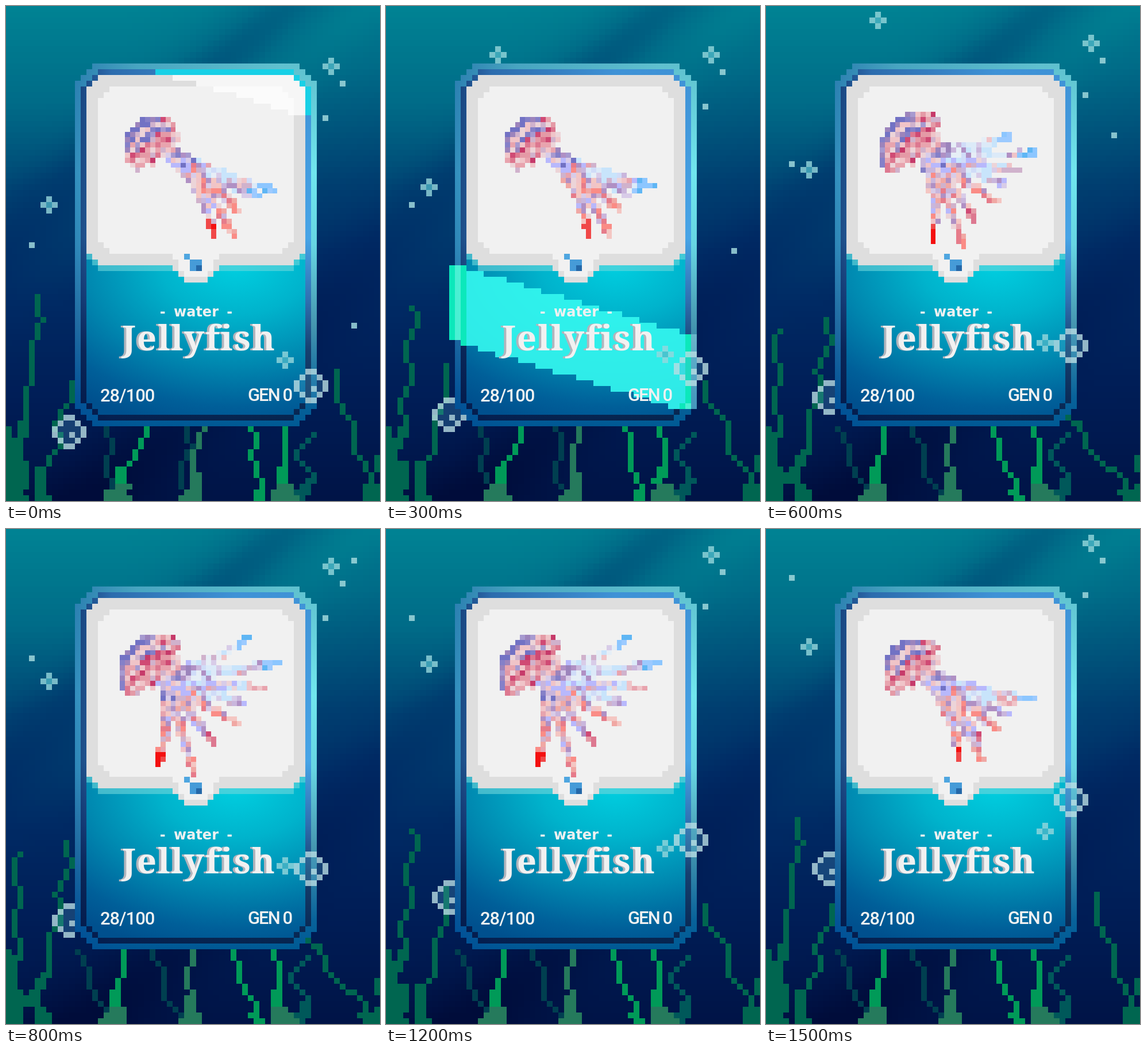
An HTML page with a canvas that plays this animation: 651x861 px, repeating every 1700 ms.

```html
<!DOCTYPE html>
<html lang="en">
<head>
<meta charset="utf-8">
<title>Jellyfish card</title>
<style>
  html, body { margin: 0; width: 651px; height: 861px; overflow: hidden; background: #00285c; }
  canvas, svg { position: absolute; left: 0; top: 0; display: block; }
  text { fill: #f1f1f1; }
  .name { font: 800 60px "Noto Serif", serif; letter-spacing: 2px; text-anchor: middle; }
  .kind { font: bold 24px "DejaVu Sans", sans-serif; word-spacing: 6px; text-anchor: middle; }
  .small { font: 500 31px Roboto, sans-serif; }
</style>
</head>
<body>
<canvas id="stage" width="651" height="861"></canvas>
<svg width="651" height="861" viewBox="0 0 651 861">
  <text class="kind" x="331" y="540">- water -</text>
  <text class="name" x="332" y="599" style="fill:#b2b4bc">Jellyfish</text>
  <text class="name" x="336" y="599">Jellyfish</text>
  <text class="small" x="164" y="688" letter-spacing="-1">28/100</text>
  <text class="small" x="421" y="687" letter-spacing="-2">GEN 0</text>
</svg>
<script>
const ctx = document.getElementById('stage').getContext('2d');
const px = v => Math.round(v * 651 / 65);
const mix = (a, b, u) => a + (b - a) * u;
const clamp = u => Math.max(0, Math.min(1, u));
const smooth = u => u * u * (3 - 2 * u);
const hash = (x, y) => {
  const n = Math.sin(x * 12.9898 + y * 78.233) * 43758.5453;
  return n - Math.floor(n);
};
const pick = (list, r) => list[Math.floor(r * list.length)];

function box(x, y, w, h, color, g = ctx) {
  g.fillStyle = color;
  g.fillRect(px(x), px(y), px(x + w) - px(x), px(y + h) - px(y));
}

// Rectangle with stair-step corners, n cells deep
function stepPath(x, y, w, h, n) {
  ctx.beginPath();
  for (let i = 0; i <= n; i++) {
    const d = n - i, l = px(x + d), t = px(y + i);
    ctx.rect(l, t, px(x + w - d) - l, px(y + h - i) - t);
  }
}

function steps(shape, ...fills) {
  stepPath(...shape);
  for (const fill of fills) {
    ctx.fillStyle = fill;
    ctx.fill();
  }
}

function ramp(grad, stops) {
  stops.forEach(([at, color]) => grad.addColorStop(at, color));
  return grad;
}

// --- sea: depth colours bent by slanted rays ---
const DEPTHS = [[0, 130, 147, 0], [0, 108, 136, 160], [0, 62, 112, 350],
                [0, 42, 100, 500], [0, 29, 86, 680], [0, 12, 58, 1000]];
const bump = (v, mid, size) => Math.exp(-(((v - mid) / size) ** 2));

function seaColor(x, y) {
  const s = x + 1.2 * y;
  const ray = (bump(s, 475, 85) * 150 - bump(s, 620, 70) * 50) * Math.max(0.3, 1 - y / 600)
            + bump(s, 1150, 110) * y * 0.2;
  const d = Math.max(0, Math.min(999, y + 0.17 * Math.max(0, x - 200) * (1 - y / 900) + ray));
  const i = DEPTHS.findIndex(c => c[3] > d);
  const a = DEPTHS[i - 1], b = DEPTHS[i], u = (d - a[3]) / (b[3] - a[3]);
  return `rgb(${[0, 1, 2].map(k => Math.round(mix(a[k], b[k], u)))})`;
}

const sea = document.createElement('canvas');
sea.width = 651;
sea.height = 861;
const seaCtx = sea.getContext('2d');
for (let y = 0; y < 86; y++)
  for (let x = 0; x < 65; x++) box(x, y, 1, 1, seaColor(x * 10, y * 10), seaCtx);

// --- seaweed ---
const MID = '#006650', BRIGHT = '#009a58', GREY = '#257a5c', DARK = '#003f50', DEEP = '#00585a';
// colour, root, top, lean, wave, foot, drift, growth
const sideWeeds = [
  [MID, 1, 50, 4.5, 0.6, 4, -1, 1.5],
  [MID, 0, 73, 0, 0.5, 3, 0, 0],
  [MID, 5, 65, 6, 0.7, 2, -0.1, -2.7],
  [MID, 64, 63, -8, 0.8, 1, -1, 2],
  [MID, 64, 78, 0, 0.6, 2, 0, 0]
];
const midWeeds = [
  [DARK, 18, 73, -1, 0.6, 0, -1.3, 0],
  [DARK, 30, 73, 1, 0.8, 0, -1.5, 0],
  [DEEP, 51, 74, 1, 1.5, 4, -0.3, 0],
  [BRIGHT, 18, 73, 6, 0.4, 6, -1, 0],
  [GREY, 32, 73, 1, 0.6, 4, -0.4, 0],
  [BRIGHT, 44, 73, -2, 0.4, 1, -0.9, 0],
  [BRIGHT, 48, 73, 0, 0.4, 6, -0.4, 0]
];

function weed([color, root, top, lean, wave, foot, drift, growth], pose) {
  const bend = pose * pose, tip = Math.round(top + growth * bend);
  let last;
  for (let y = tip; y < 86; y++) {
    const u = (86 - y) / (86 - tip);
    const x = Math.round(root + (lean + drift * bend) * u + wave * Math.sin(y * 0.7 + root));
    const w = 1 + Math.round(foot * (1 - u) ** 4);
    const from = last < x - 1 ? last + 1 : x, to = last > x + 1 ? last - 1 : x;
    box(from - (w >> 1), y, to - from + w, 1, color === BRIGHT && w > 2 ? GREY : color);
    last = x;
  }
}

// --- bubbles and sparkles ---
const rise = (y, speed, gain, k) => Math.round(y - speed * k - gain * k * k);

function bubble(x, y) {
  for (let j = 0; j < 6; j++)
    for (let i = 0; i < 6; i++) {
      const r = Math.hypot(i - 2.5, j - 2.5);
      if (r > 2.7) continue;
      const rim = r > 2 || (i === 3 && j === 3);
      box(x + i, y + j, 1, 1, rim ? 'rgba(185,222,228,.8)' : 'rgba(90,170,205,.25)');
    }
}

function sparkle(x, y) {
  for (const [i, j] of [[0, -1], [-1, 0], [1, 0], [0, 1]]) box(x + i, y + j, 1, 1, 'rgba(150,215,220,.8)');
  box(x, y, 1, 1, 'rgba(80,185,200,.75)');
}

const dot = (x, y) => box(x, y, 1, 1, 'rgba(160,215,220,.85)');

function behind(n, phase) {
  bubble(8, rise(71, 2.6, 0.28, phase));
  sparkle(19, rise(14, 2, 0, n));
  sparkle(7, rise(34, 1, 0, n));
  sparkle(56, rise(10, 2, 0, phase));
  dot(4, rise(41, 2.36, 0, n));
  dot(58, rise(13, 1.9, 0, phase));
  dot(55, rise(19, 2, 0, phase));
  dot(60, rise(55, 3.3, 0.37, n));
}

function inFront(phase) {
  bubble(50, rise(63, 2.5, 0.55, phase));
  sparkle(48, rise(61, 0.9, 0.35, phase));
}

// --- jellyfish ---
const hues = {
  violet: ['#7272c4', '#8580c8', '#a79ad0', '#9c84bc'],
  crimson: ['#d04a74', '#c63a6a', '#dd7890', '#e49aa6'],
  pink: ['#f0c4c8', '#e8a4ae', '#d0b2cc', '#ecd4d8'],
  lilac: ['#b8b8fc', '#c9b6dc', '#d8cce8', '#b090c4'],
  pale: ['#dceaf8', '#d0dcf8', '#c8e4fb', '#e6eef6'],
  salmon: ['#fa8c86', '#f0a8a4', '#e67c8a', '#f4c6c2'],
  red: ['#f41010', '#f04848'],
  azure: ['#5fb6f4', '#8cc6ff', '#9ccaff']
};
// closed tip, open tip, tip colour
const arms = [
  [18, 24, 7, 25, 'red'], [22, 24, 14, 27, 'salmon'], [20, 21, 18, 21, 'crimson'], [23, 19, 23, 17, 'salmon'],
  [25, 16, 24, 13, 'lilac'], [25, 14, 28, 10, 'pink'], [30, 15, 31, 5, 'azure'], [27, 16, 25, 0, 'azure']
];

function cell(x, y, hue) {
  const X = v => Math.round(198 + v * 8.85), Y = v => Math.round(184 + v * 8.85);
  ctx.fillStyle = pick(hues[hue], hash(x, y + 3));
  ctx.fillRect(X(x), Y(y), X(x + 1) - X(x), Y(y + 1) - Y(y));
}

function arm([cx, cy, ox, oy, tipHue], i, open) {
  const tx = mix(cx, ox, open), ty = mix(cy, oy, open);
  const bx = mix(15, 10 + 0.8 * i, open), by = mix(11, 15 - 1.2 * i, open);
  const mids = i < 4 ? ['pink', 'salmon', 'lilac'] : ['pale', 'pink', 'lilac', 'pale'];
  const curve = (a, b, c, s) => mix(mix(a, b, s), mix(b, c, s), s);
  for (let s = 0; s <= 1; s += 0.02) {
    const x = curve(8, bx, tx, s), y = curve(7, by, ty, s), r = 1.6 - 0.9 * s;
    for (let v = Math.ceil(y - r); v <= y + r; v++)
      for (let u = Math.ceil(x - r); u <= x + r; u++) {
        if (Math.hypot(u - x, v - y) > r || u > 31) continue;
        const h = hash(u + 5, v);
        cell(u, v, s > 0.9 ? tipHue : s < 0.4 ? pick(['lilac', 'pink', 'violet', 'lilac'], h) : pick(mids, h));
      }
  }
}

// Tilted dome with a ragged rim; along runs from crown to rim
function bell(open) {
  const edge = open < 0.5 ? 1 : 0;
  for (let y = edge; y < 14; y++)
    for (let x = edge; x < 14; x++) {
      const along = (x + y) * Math.SQRT1_2, across = (x - y) * Math.SQRT1_2, h = hash(x + 9, y);
      const depth = along - (2.9 - 0.8 * open) - 0.08 * across ** 2;
      const rim = 10.6 - 0.05 * across ** 2 + 1.8 * h;
      if (depth < 0 || along > rim || Math.abs(across) > 6.2 + 1.3 * open) continue;
      const warm = h < 0.55 ? 'crimson' : 'pink';
      if (across < -3.5 && depth > 1.5 || across > 4.5) cell(x, y, warm);
      else if (depth < 1.7) cell(x, y, 'violet');
      else if (depth < 3) cell(x, y, 'pink');
      else if (depth < 4.2) cell(x, y, h < 0.7 ? 'violet' : 'pink');
      else cell(x, y, warm);
    }
}

function jelly(n) {
  const open = smooth(clamp(Math.min((n - 2) / 6, (15 - n) / 3)));
  for (let i = arms.length - 1; i >= 0; i--) arm(arms[i], i, open);
  bell(open);
}

// --- card ---
const OUTER = [12, 10, 42, 63, 3], RING = [13, 11, 40, 61, 3], BODY = [14, 12, 38, 59, 2];
const outerFill = ramp(ctx.createLinearGradient(0, 100, 0, 731),
  [[0, '#5fc0ce'], [.3, '#70e6ee'], [.5, '#66d5e2'], [.72, '#4596b0'], [.92, '#08629a'], [1, '#005a94']]);
const outerShade = ramp(ctx.createLinearGradient(120, 0, 480, 0),
  [[0, 'rgba(0,70,150,.55)'], [.3, 'rgba(0,80,150,.25)'], [1, 'rgba(0,80,150,0)']]);
const ringFill = ramp(ctx.createLinearGradient(0, 110, 0, 721),
  [[0, '#3f92d6'], [.48, '#47a4e6'], [.66, '#2f6fb0'], [.8, '#16406f'], [1, '#06244f']]);
const ringShade = ramp(ctx.createLinearGradient(130, 0, 400, 0),
  [[0, 'rgba(0,18,70,.6)'], [.2, 'rgba(0,20,80,.3)'], [1, 'rgba(0,20,70,0)']]);
const bodyFill = ramp(ctx.createRadialGradient(0, 0, 0, 0, 0, 290),
  [[0, '#00cfe0'], [.3, '#00b3cc'], [.6, '#0088b0'], [.85, '#005f99'], [1, '#00508e']]);

// Slanted light sweeping down the card, clipped to a stepped shape
function shine(t, shape, color, top = 0, bottom = 86) {
  if (t >= 500) return;
  ctx.save();
  stepPath(...shape);
  ctx.clip();
  for (let x = 11; x < 54; x++) {
    const tilt = (x - 52) * 0.3;
    const from = Math.max(top, Math.round(0.194 * t - 1.2 + tilt));
    const to = Math.min(bottom, Math.round(0.17 * t + 19.4 + tilt));
    if (to > from) box(x, from, 1, to - from, color);
  }
  ctx.restore();
}

function body() {
  stepPath(...BODY);
  ctx.save();
  ctx.translate(400, 450);
  ctx.scale(1.5, 1);
  ctx.fillStyle = bodyFill;
  ctx.fill();
  ctx.restore();
}

function panel() {
  const grey = '#dedede', white = '#f1f1f1';
  steps([14, 13, 38, 33, 2], 'rgba(110,215,220,.6)');
  steps([14, 12, 38, 33, 2], grey);
  steps([16, 14, 34, 29, 2], white);
  for (let i = 0; i < 3; i++) box(29 + i, 45 + i, 8 - 2 * i, 1, grey);
  box(29, 43, 8, 1, white);
  box(30, 44, 6, 2, white);
  box(31, 46, 4, 1, white);
  box(31, 43, 1, 1, '#4fa6e0');
  box(32, 44, 2, 2, '#469bd8');
  box(33, 45, 1, 1, '#2568a8');
}

function card(n) {
  const t = n * 100, late = clamp((t - 200) / 200);
  const glow = `rgb(${mix(24, 0, late)},${mix(208, 255, late)},${mix(230, 144, late)})`;
  const wash = `rgba(${mix(105, 0, late)},${mix(242, 255, late)},240,${mix(0.8, 1, late)})`;
  steps(OUTER, outerFill, outerShade);
  shine(t, [11, 11, 42, 63, 3], glow);
  shine(t, OUTER, `rgba(190,255,255,${late * 0.7})`);
  steps(RING, ringFill, ringShade);
  shine(t, RING, glow);
  body();
  panel();
  jelly(n);
  shine(t, BODY, 'rgba(255,255,255,.72)', 0, 45);
  shine(t, BODY, wash, 45);
}

function draw(n) {
  const phase = Math.floor(n / 3);
  ctx.drawImage(sea, 0, 0);
  sideWeeds.forEach(w => weed(w, 2 - Math.abs(phase - 2)));
  midWeeds.forEach(w => weed(w, Math.min(phase, 2)));
  behind(n, phase);
  card(n);
  inFront(phase);
}

// Ten steps a second, resting two ticks on step 10 and on the last one
let shown = -1;
const start = performance.now();
function tick() {
  const beat = Math.floor((performance.now() - start) / 100) % 17;
  const n = Math.min(14, beat > 10 ? beat - 1 : beat);
  if (n !== shown) draw(shown = n);
  requestAnimationFrame(tick);
}
tick();
</script>
</body>
</html>
```
